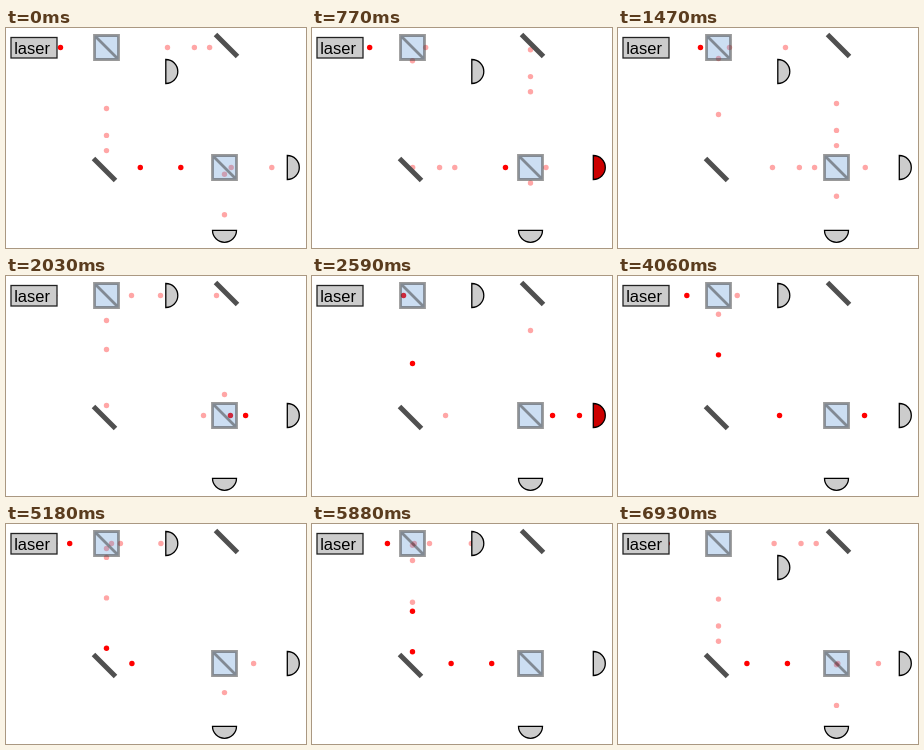
Recreate the animation shown at these times as an HTML page. Size 300x220 px, loop 7000 ms.

```html
<!DOCTYPE html>
<html lang="en">
<head>
<meta charset="utf-8">
<title>Photons in an interferometer</title>
<style>
  html, body { margin: 0; width: 100%; height: 100%; overflow: hidden; background: #fff; }
  svg { display: block; width: 300px; height: 220px; }
  .detector { fill: #ccc; stroke: #000; stroke-width: 1.3; }
  .detector.hit { fill: #c00; }
  .mirror { stroke: #505050; stroke-width: 5; }
  .glass { fill: rgba(80, 140, 210, .29); }
  .frame { fill: none; stroke: rgba(60, 60, 60, .52); stroke-width: 2.8; }
  #photons { fill: #f00; }
  text { font: 16.5px "Liberation Sans", Arial, sans-serif; }
</style>
</head>
<body>
<svg viewBox="0 0 300 220">
  <defs>
    <g id="splitter">
      <rect class="glass" x="-12" y="-12" width="24" height="24"/>
      <path class="frame" d="M-12-12H12V12H-12ZL12 12"/>
    </g>
    <path id="half" d="M0-12A12 12 0 0 1 0 12Z"/>
  </defs>
  <g id="photons"></g>
  <rect x="5" y="9.5" width="46" height="20.5" fill="#ccc" stroke="#222" stroke-width="1.3"/>
  <text x="8.2" y="26">laser</text>
  <use href="#splitter" x="100.5" y="19.5"/>
  <use href="#splitter" x="218.5" y="139.5"/>
  <path class="mirror" d="M209.5 6.5l22 22M87.5 130.5l22 22"/>
  <use href="#half" class="detector" id="probe"/>
  <use href="#half" class="detector" id="right" transform="translate(281.3 139.5)"/>
  <use href="#half" class="detector" id="bottom" transform="translate(218.5 202.3) rotate(90)"/>
</svg>
<script>
const STEP = 70, STEPS = 100, SPEED = 5.38, LAP = SPEED * STEPS;
const X1 = 100.5, X2 = 218.5, Y1 = 19.5, Y2 = 139.5;
// Path lengths at which a photon meets the probe, second splitter and outer detectors
const PROBE = 159.5, JOIN = X2 + Y2 - Y1, END = 401;

// [path length at time zero, fate]; "free" photons pass while the probe is out
const photons = [
  [54.5, "free"], [-1.5, "probe"], [-30.5, "right"], [-107.5, "probe"],
  [-152.2, "bottom"], [-192.8, "right"], [-243.2, "bottom"], [-283.7, "right"],
  [-292.6, "probe"], [-334.4, "free"], [-349.6, "free"], [-376.5, "free"]
];

const $ = id => document.getElementById(id);
const layer = $("photons");
const dots = photons.flatMap(() => [0, 1]).map(() => {
  const c = document.createElementNS("http://www.w3.org/2000/svg", "circle");
  c.setAttribute("r", 2.7);
  return layer.appendChild(c);
});

const upper = s => s < X2 ? [s, Y1] : [X2, Y1 + s - X2];
const lower = s => {
  const d = s - X1, drop = Y2 - Y1;
  return d < drop ? [X1, Y1 + d] : [X1 + d - drop, Y2];
};
const outRight = s => [X2 + s - JOIN, Y2];
const outDown = s => [X2, Y2 + s - JOIN];

// One place means a certain photon, two places a split one
function places(s, fate) {
  if (s < 40 || s >= END) return [];
  if (s <= X1) return [[s, Y1]];
  const free = fate === "free";
  if (s > JOIN) return free ? [outRight(s)] : fate === "probe" ? [] : [outRight(s), outDown(s)];
  if (free || s < PROBE) return [upper(s), lower(s)];
  return fate === "probe" ? [] : [lower(s)];
}

function ease(f, from, to) {
  const u = Math.min(1, Math.max(0, (f - from) / (to - from)));
  return u * u * (3 - 2 * u);
}

function draw(f) {
  const hits = new Set();
  photons.forEach(([start, fate], i) => {
    const s = ((start + SPEED * f) % LAP + LAP) % LAP;
    const past = s - (fate === "probe" ? PROBE : END);
    if (past >= 0 && past < SPEED) hits.add(fate === "free" ? "right" : fate);
    const at = places(s, fate);
    for (let k = 0; k < 2; k++) {
      const dot = dots[2 * i + k], p = at[k];
      dot.setAttribute("visibility", p ? "visible" : "hidden");
      if (!p) continue;
      dot.setAttribute("cx", p[0]);
      dot.setAttribute("cy", p[1]);
      dot.setAttribute("opacity", at.length > 1 ? .35 : 1);
    }
  });
  for (const id of ["probe", "right", "bottom"]) $(id).classList.toggle("hit", hits.has(id));
  const out = 1 - ease(f, 23, 28) + ease(f, 88, 93);
  $("probe").setAttribute("transform", `translate(159.8 ${Y1 + 24 * out})`);
}

function tick() {
  draw(Math.floor(performance.now() / STEP) % STEPS);
  requestAnimationFrame(tick);
}
tick();
</script>
</body>
</html>
```
